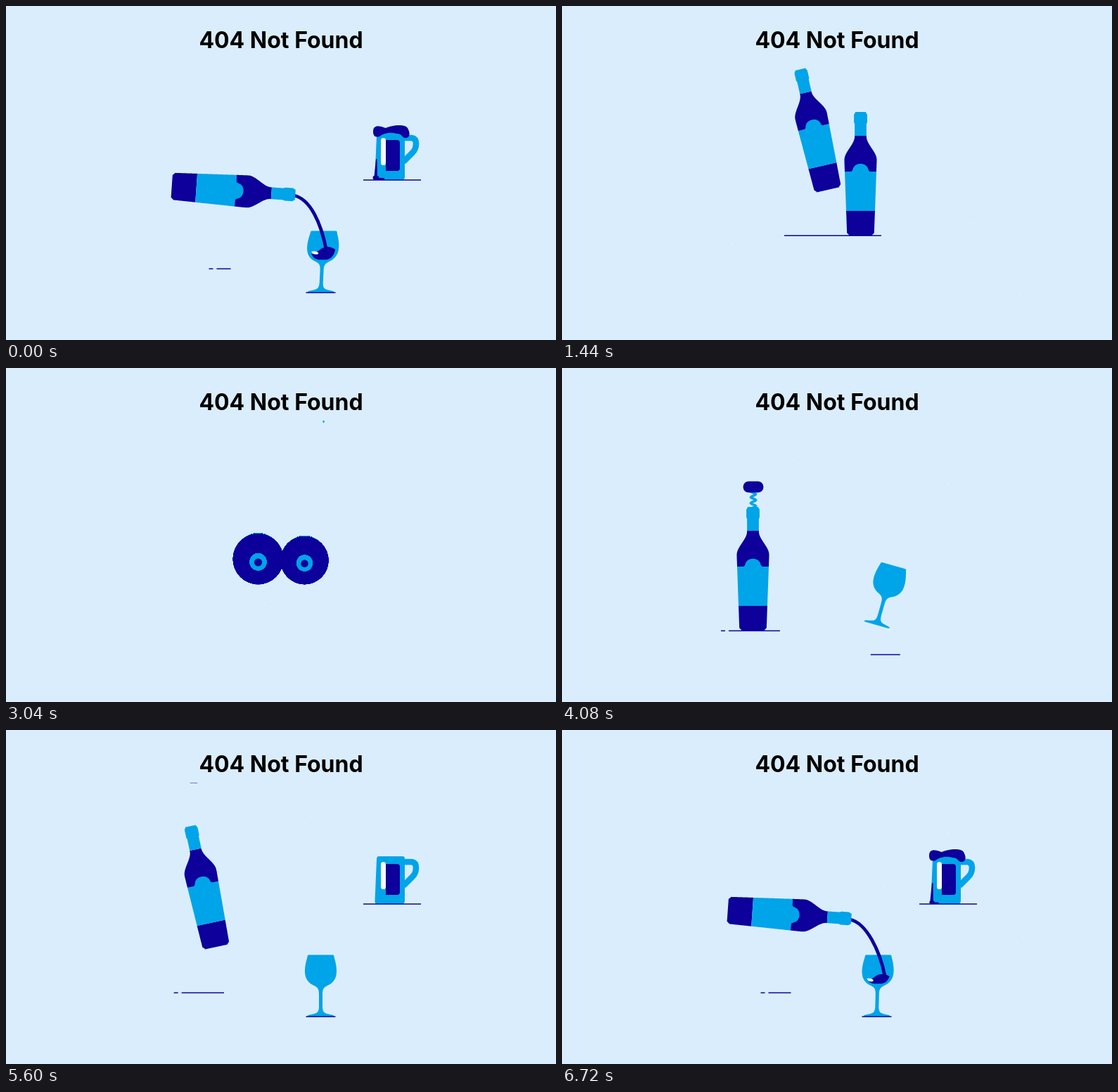
An HTML page with a canvas that plays this animation: 782x476 px, repeating every 6800 ms.

```html
<!DOCTYPE html>
<html lang="en">
<head>
<meta charset="utf-8">
<title>404 Not Found</title>
<style>
  html, body { margin: 0; width: 100%; height: 100%; overflow: hidden; background: #daedfc; }
  canvas { position: absolute; left: 0; top: 0; }
  h1 { position: absolute; left: 0; top: 29px; width: 782px; margin: 0; text-align: center;
       font: 700 32px/40px Inter, sans-serif; color: #000; }
</style>
</head>
<body>
<canvas id="stage" width="782" height="476"></canvas>
<h1>404 Not Found</h1>
<script>
const LOOP = 6800, STEP = 80;
const LANDING = 1600; // the tossed bottle lands: the story starts and ends here
const LIFT = 320;     // the camera starts to leave the glass and the mug
const DARK = '#0d009b', BLUE = '#00a4e8', WHITE = '#fff';
const c = document.getElementById('stage').getContext('2d');

const part = (t, from, to) => Math.min(1, Math.max(0, (t - from) / (to - from)));
const fall = (t, from, to) => part(t, from, to) ** 2;
const ease = (t, from, to) => {
  const u = part(t, from, to);
  return u * u * (3 - 2 * u);
};

function at(x, y, angle, draw) {
  c.save();
  c.translate(x, y);
  c.rotate(angle * Math.PI / 180);
  draw();
  c.restore();
}

function fill(color, path) {
  c.fillStyle = color;
  c.fill(new Path2D(path));
}

function oval(color, x, y, rx, ry, turn = 0) {
  c.fillStyle = color;
  c.beginPath();
  c.ellipse(x, y, rx, ry, turn, 0, 7);
  c.fill();
}

function box(color, x, y, w, h, r) {
  c.fillStyle = color;
  c.beginPath();
  c.roundRect(x, y, w, h, r);
  c.fill();
}

function ground(x, y, half, dash = []) {
  if (half < 1) return;
  c.strokeStyle = DARK;
  c.lineWidth = 1.5;
  c.setLineDash(dash);
  c.beginPath();
  c.moveTo(x - half, y);
  c.lineTo(x + half, y);
  c.stroke();
  c.setLineDash([]);
}

// Bottle radius at a height above its base.
const radius = h => 16.2 + 3 * ease(h, 0, 4) + .036 * Math.min(h, 105)
  - 14.6 * ease(h, 108, 141) + ease(h, 159, 161) - 2 * ease(h, 172, 176);

// A solid of revolution: turn 0 is the side view, 1 the view from above.
function bottle(x, y, angle, turn, zoom) {
  const tilt = turn * 92.5 * Math.PI / 180, sin = Math.sin(tilt), cos = Math.cos(tilt);

  function band(color, from, to) {
    if (turn > 0) {
      for (let h = from; h <= to; h += .5) {
        const r = radius(h) * (h > 133 ? 1 - .19 * sin : 1);
        oval(color, 0, (88 - h) * cos, r, Math.max(.6, r * sin));
      }
      return;
    }
    c.fillStyle = color;
    c.beginPath();
    for (let h = from; h <= to; h++) c.lineTo(radius(h), 88 - h);
    for (let h = to; h >= from; h--) c.lineTo(-radius(h), 88 - h);
    c.fill();
  }

  at(x, y, angle, () => {
    c.scale(zoom, zoom);
    band(DARK, 0, 35);
    band(BLUE, 35, 91);
    band(DARK, 91, 142);
    band(BLUE, 142, 176);
    if (cos > .3) {
      c.save();
      c.translate(0, 22 * sin);
      c.scale(1, cos);
      fill(BLUE, 'M-19 -2Q-12 -2 -11 -6C-9 -17 9 -17 11 -6Q12 -2 19 -2Z');
      c.restore();
    }
    if (sin > .1) oval(DARK, 0, -88 * cos, 3.6, 3.6 * sin);
  });
}

function corkscrew(x, y, cork) {
  c.strokeStyle = BLUE;
  c.lineWidth = 3.5;
  c.beginPath();
  for (let d = 6; d < 44; d++) c.lineTo(x + 3.5 * Math.sin(d * .75), y + d);
  c.stroke();
  if (cork) box(DARK, x - 5.5, y + 26, 11, 22, 1);
  box(DARK, x - 14.5, y - 8, 29, 16, 8);
}

function glass(x, y, angle, lean, level, wave) {
  at(x, y, angle, () => {
    c.transform(1, 0, -lean, 1, 0, 0);
    fill(BLUE, 'M-17 -88H17Q19 -88 19 -85C24 -68 26 -51 9 -44C3 -41 2.5 -38 2.5 -30V-14'
      + 'C3 -4 6 -5 18 -2Q20 0 16 0H-16Q-20 0 -18 -2C-6 -5 -3 -4 -2.5 -14V-30'
      + 'C-2.5 -38 -3 -41 -9 -44C-26 -51 -24 -68 -19 -85Q-19 -88 -17 -88Z');
    if (level > -47) return;
    c.clip(new Path2D('M-17 -80H17C20 -62 17 -48 5 -47H-5C-17 -48 -20 -62 -17 -80Z'));
    const left = level + 6 * wave, crest = level - 3 * wave;
    fill(DARK, `M-22 ${left}C-6 ${left + 3 * wave} -6 ${crest} 6 ${crest}`
      + `Q14 ${crest} 22 ${level + 4 * wave}V-40H-22Z`);
    if (wave > .5) oval(WHITE, -11, level + 5.5, 5, 2, .2);
  });
}

function stream(x, y, endX, endY, offset) {
  c.strokeStyle = DARK;
  c.lineWidth = 4.8;
  c.setLineDash([115, 115]);
  c.lineDashOffset = offset;
  c.beginPath();
  c.moveTo(x, y);
  c.bezierCurveTo(x + 24, y + 5, endX - 7, endY - 35, endX, endY);
  c.stroke();
  c.setLineDash([]);
  c.lineDashOffset = 0;
}

function mug(x, y, angle, foam, drip, puddle) {
  at(x, y, angle, () => {
    c.strokeStyle = BLUE;
    c.lineWidth = 8.5;
    c.lineJoin = 'round';
    c.stroke(new Path2D('M17 -60H29Q35 -59 35 -52Q35 -44 30 -39L17 -26'));
    fill(BLUE, 'M-18 -68H16Q19 -68 19 -64V-5Q19 0 15 0H-20Q-24 0 -23.5 -5L-21 -64Q-21 -68 -18 -68Z');
    box(DARK, -14, -57, 26, 44, 4);
    box(BLUE, -15, -58, 7, 46, 2);
    box(WHITE, -15, -60, 7, 39, 3.5);
    fill(DARK, `M-22 ${-30 * drip}H-20.5L-20 0H-25Z`);
    oval(DARK, -22, -3.5 * puddle, 4.8 * puddle, 3.5 * puddle);
    box(DARK, -22, -3.2 * puddle, 13 * puddle, 3.2 * puddle, 2);
    c.translate(0, -66);
    c.scale(foam, foam);
    fill(DARK, 'M-26 -3C-26 -14 -16 -11 -8 -8C0 -12 22 -15 24 -6C27 0 26 6 20 6'
      + 'C14 6 16 0 8 0C-4 -3 -12 0 -17 4C-24 6 -26 2 -26 -3Z');
  });
}

function specks(seed) {
  const random = () => {
    const v = Math.sin(++seed * 127.1) * 43758.5453;
    return v - Math.floor(v);
  };
  c.globalAlpha = .5;
  for (let i = 0; i < 16; i++) oval(WHITE, 127 + 528 * random(), 80 + 375 * random(), .9, .7);
  c.globalAlpha = 1;
}

const turnAt = t => ease(t, 2240, 2800) - ease(t, 3400, 3920);

// The shelf and the second bottle rise into view as the camera moves.
function drawShelf(t) {
  if (t > 3400) return;
  const rise = 600 * (1 - ease(t, LIFT, 1280)), turn = turnAt(t);
  ground(385, 327.3 + rise, 69 * (1 - ease(t, 2160, 2480)));
  bottle(424.5 - 66 * ease(t, 3040, 3400), 239 + 34 * turn + rise, 0, turn, 1 + .48 * turn);
}

function drawMug(t, scroll) {
  const y = 20 + 228 * fall(t, 4840, 5200) - scroll;
  const angle = -20 * (1 - ease(t, 4920, 5280));
  const drip = ease(t, 6240, 6640) - ease(t, 6880, 7280);
  mug(548, y, angle, ease(t, 5680, 6080), drip, 1.5 * ease(t, 6240, 7200));
  ground(549, 248 - scroll, 41 * ease(t, 5040, 5240));
}

function drawGlass(t, scroll, pose) {
  const settle = 1 - ease(t, 3680, 4240);
  const lean = .05 * (ease(t, 6640, 6800) - ease(t, 6800, 7120));
  const level = -46 - 28 * ease(t, 6400, 7120);
  glass(447.5, 60 + 348.5 * fall(t, 3600, 4112) - scroll, 80 * settle, lean, level,
    1 - ease(t, 6800, 7280));
  ground(447.5 + 62 * settle, 408.6 - scroll, 21 * ease(t, 3760, 4080));

  const flow = 1 - ease(t, 6320, 6560) - ease(t, 6960, 7200);
  if (Math.abs(flow) === 1) return;
  const a = pose.angle * Math.PI / 180;
  stream(pose.x + 86 * Math.sin(a), pose.y - 86 * Math.cos(a) + 1,
    459 - 4 * ease(t, 6720, 6800), 408 + level - scroll, 115 * flow);
}

// Land, turn up, slide left, jump, tip over to pour, sink, toss and land again.
const bottlePose = t => ({
  x: 358.5 - 87 * ease(t, 3400, 3920) + 52 * ease(t, 5200, 6700) + 35 * ease(t, 6800, 8080),
  y: 239 + 32 * ease(t, 2240, 2800) + 15 * ease(t, 3400, 3920) - 63 * ease(t, 5200, 5600)
    + 40 * ease(t, 5600, 6640) + 50 * ease(t, 6800, 7440) - 158 * ease(t, 7440, 8080)
    + 84 * fall(t, 8080, 8400),
  angle: -12 * ease(t, 5200, 5600) + 106 * ease(t, 5680, 6400) + 266 * ease(t, 7200, 8400)
});

function draw(now) {
  const time = Math.floor(now % LOOP / STEP) * STEP;
  const t = time < LANDING ? time + LOOP : time;
  const scroll = 600 * ease(t, LOOP + LIFT, LOOP + 1280);
  const pose = bottlePose(t), turn = turnAt(t);

  c.clearRect(0, 0, 782, 476);
  c.save();
  c.beginPath();
  c.rect(0, 75, 782, 401);
  c.clip();
  specks(Math.floor(time / 160) * 40);

  drawShelf(t >= LOOP + LIFT ? t - LOOP : t);
  const half = 42 * ease(t, 3760, 4080) - 18 * ease(t, 5200, 6200) - 24 * ease(t, 6640, 7040);
  ground(268 + 36 * ease(t, 5200, 6700), 374.4 - scroll, half, [6, 5, 999]);
  drawMug(t, scroll);
  drawGlass(t, scroll, pose);
  corkscrew(272 - 5 * ease(t, 5120, 5600), 20 + 149.5 * ease(t, 3840, 4080)
    + 14.5 * ease(t, 4160, 4640) - 213 * fall(t, 5120, 5680), t > 4640);
  bottle(pose.x, pose.y, pose.angle, turn, 1 + .56 * turn);
  c.restore();
}

function frame() {
  draw(performance.now());
  requestAnimationFrame(frame);
}
frame();
</script>
</body>
</html>
```
